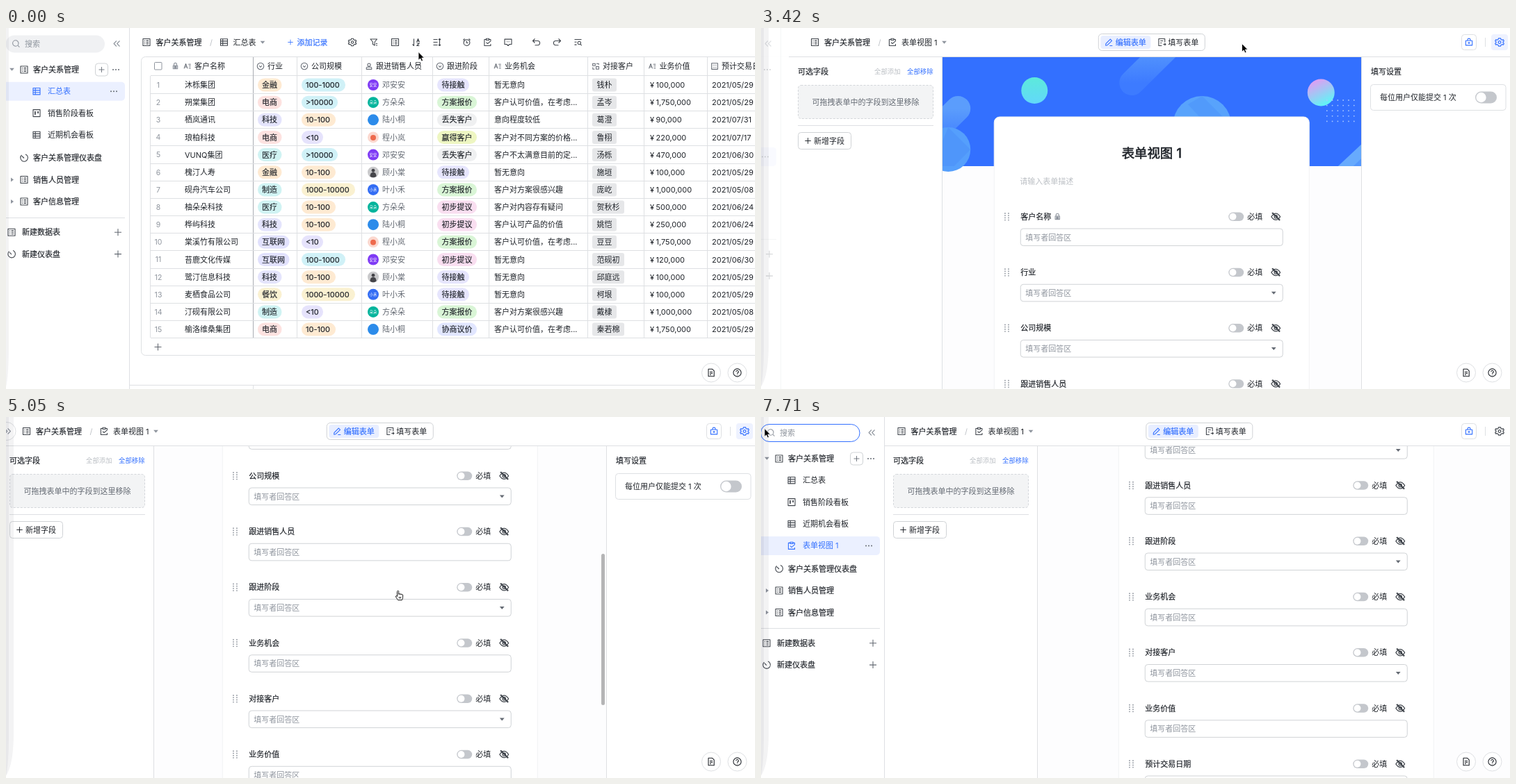
Animation of 1077x520 px, one loop 8 s. Source, as an HTML page:

```html
<!DOCTYPE html>
<html lang="zh-CN">
<head>
<meta charset="utf-8">
<style>
html, body { margin: 0; width: 100%; height: 100%; overflow: hidden; background: #fff; }
svg { display: block; width: 100%; height: 100%; }
text { font-family: Inter, 'Noto Sans CJK SC', 'Noto Sans CJK', sans-serif; white-space: pre; }
</style>
</head>
<body>
<svg id="stage" viewBox="0 0 1077 520" preserveAspectRatio="xMidYMid meet"></svg>
<script>
const INK = '#1f2329', SOFT = '#646a73', GREY = '#8f959e', PALE = '#bbbfc4', LINE = '#dee0e3', BLUE = '#3370ff';

// Icon outlines, drawn around their own centre
const ICONS = {
  base: 'M-5-5H5V5H-5ZM-3-2.4h1M-.5-2.4H3M-3 0h1M-.5 0H3M-3 2.4h1M-.5 2.4H3',
  sheet: 'M-5-4.7H5V4.7H-5ZM-5-1.6H5M-5 1.6H5M-1.8-4.7V4.7',
  kanban: 'M-5-5H5V5H-5ZM-2.4-2.6V2.4M-1.8-2.6V2.4M1.8-2.6V.4M2.4-2.6V.4',
  dial: 'M-3.4-4A5.3 5.3 0 1 0 2-5M0 .5L-3-2.5',
  gear: 'M-1.3-5.2H1.3L1.9-3.7 3.3-2.9 4.9-3.3 5.7-1.5 4.5-.5V.5L5.7 1.5 4.9 3.3 3.3 2.9 1.9 3.7 1.3 5.2H-1.3L-1.9 3.7-3.3 2.9-4.9 3.3-5.7 1.5-4.5.5V-.5L-5.7-1.5-4.9-3.3-3.3-2.9-1.9-3.7ZM1.7 0A1.7 1.7 0 1 1-1.7 0A1.7 1.7 0 1 1 1.7 0',
  filter: 'M-5-4.5H4.5L1.2-.5V4.5L-1.6 3V-.5ZM3 2H5M3 4.5H5',
  sort: 'M-3-5V5L-5 3M1 0L3-5 5 0M1.6-1.6H4.4M1.2 1.5H4.8L1.2 5H4.8',
  height: 'M-5-4H1M-5 0H1M-5 4H1M4-5V5M2.5-3.5L4-5 5.5-3.5M2.5 3.5L4 5 5.5 3.5',
  alarm: 'M4.4.6A4.4 4.4 0 1 1-4.4.6A4.4 4.4 0 1 1 4.4.6M0-2V1H2M-5-3L-3-5M5-3L3-5',
  form: 'M-2-4H-4.6V5H4.4V2.6M4.4-1.6V-4H2M-2-5.2H2V-3H-2ZM-2 .2L0 2.2 4.6-1.8',
  chat: 'M-5-4.4H5V3H2L0 5-2 3H-5ZM-2.2-.8h.8M-.4-.8h.8M1.4-.8h.8',
  undo: 'M-2-5L-5-2-2 1M-5-2H2A3 3 0 0 1 2 4.2H-2',
  redo: 'M2-5L5-2 2 1M5-2H-2A3 3 0 0 0-2 4.2H2',
  find: 'M-5-4H5M-5-.2H-2M-5 3.6H-2M4 1A2.2 2.2 0 1 1-.4 1A2.2 2.2 0 1 1 4 1M3.4 2.8L5.2 4.6',
  search: 'M4-1A4.2 4.2 0 1 1-4.4-1A4.2 4.2 0 1 1 4-1M3 2L5.4 4.6',
  lock: 'M-3.2-.8H3.2V3.8H-3.2ZM-2-.8V-2.6A2 2 0 0 1 2-2.6V-.8M-2 1.5H2M-2 .4H2M-2 2.6H2',
  safe: 'M-4.6-2.2H4.6V4.4H-4.6ZM-2-2.2V-3.4A2 2 0 0 1 2-3.4V-2.2M0-.6V2.6M-1.6 1H1.6',
  person: 'M2.2-2A2.2 2.2 0 1 1-2.2-2A2.2 2.2 0 1 1 2.2-2M-4 4.6V3Q-4 1.4-2 1.4H2Q4 1.4 4 3V4.6Z',
  pick: 'M5 0A5 5 0 1 1-5 0A5 5 0 1 1 5 0M-2-.8L0 1.4 2-.8',
  text: 'M-5.2 3.6L-2.6-3.6 0 3.6M-4.2 1H-1M1.4-3H5M2-.2H5M2 2.8H5',
  link: 'M-4.6-4H-.8V-.8H-4.6ZM.6.6H4.6V4.4H.6ZM1-4H4.4V-2M-4.4 1.6V4.4H-1.6',
  date: 'M-4.6-4.4H4.6V4.6H-4.6ZM-2.6-1.6h1M-.5-1.6h1M1.6-1.6h1M-2.6 1.6h1M-.5 1.6h1M1.6 1.6h1',
  hidden: 'M-5.8 0Q0-8.4 5.8 0Q0 8.4-5.8 0ZM2 0A2 2 0 1 1-2 0A2 2 0 1 1 2 0M-5-5L5 5M-4.2-5.4L5.6 4.4',
  pen: 'M-4.4 2.2L2-4.4 4.2-2.2-2.2 4.2-4.6 4.6ZM1 5H5',
  fill: 'M4.4 0V-5H-4.4V5H0M-2-2H2M2 3H5.4M4 1.4L5.6 3 4 4.6M-2 1H0',
  doc: 'M-4-5.2H1.6L4.2-2.6V5.2H-4ZM-2-1H2M-2 1H2M-2 3H0',
  help: 'M5.6 0A5.6 5.6 0 1 1-5.6 0A5.6 5.6 0 1 1 5.6 0M-1.8-1.2A1.8 1.8 0 1 1 0 .6V1.4M0 2.8V3.4',
  plus: 'M-5 0H5M0-5V5',
  fold: 'M-.6-4L-4.4 0-.6 4M4-4L.2 0 4 4',
  unfold: 'M.6-4L4.4 0 .6 4M-4-4L-.2 0-4 4'
};

const path = (d, fill, extra = '') => `<path d="${d}" fill="${fill}" ${extra}/>`;
const icon = (name, x, y, color = '#41464d', k = 1) =>
  `<path transform="translate(${x} ${y}) scale(${k})" d="${ICONS[name]}" fill="none" stroke="${color}" stroke-width="1.1" stroke-linejoin="round"/>`;
const box = (x, y, w, h, r, fill, stroke = 'none', extra = '') =>
  `<rect x="${x}" y="${y}" width="${w}" height="${h}" rx="${r}" fill="${fill}" stroke="${stroke}" ${extra}/>`;
const dot = (x, y, r, fill, stroke = 'none') => `<circle cx="${x}" cy="${y}" r="${r}" fill="${fill}" stroke="${stroke}"/>`;
const line = (d, color = LINE) => path(d, 'none', `stroke="${color}"`);
// Text is centred vertically on y; a hairline outline gives the medium weight
const label = (s, x, y, { c = INK, size = 11, bold = 0, anchor = 'start' } = {}) =>
  `<text x="${x}" y="${y + size * .37}" font-size="${size}" fill="${c}" text-anchor="${anchor}" ${bold ? `stroke="${c}" stroke-width="${bold}"` : ''}>${s.replace(/</g, '&lt;')}</text>`;
const strong = (s, x, y, c = INK) => label(s, x, y, { c, bold: .2 });
const caret = (x, y, c = SOFT) => path(`M${x - 3.4} ${y - 1.8}h6.8l-3.4 4z`, c);
const more = (x, y) => [-4, 0, 4].map(d => dot(x + d, y, 1, SOFT)).join('');
const toggle = (x, y, w, h) => box(x, y - h / 2, w, h, h / 2, '#c4c7cc') + dot(x + h / 2, y, h / 2 - 1.3, '#fff');
const group = (id, body, extra = '') => `<g id="${id}" ${extra}>${body}</g>`;

const INDUSTRY = { 金融: '#feead2', 电商: '#fde2e0', 科技: '#e4e4fc', 医疗: '#d0f3f3', 制造: '#d0f3f3', 互联网: '#e1e1fd', 餐饮: '#faf1d1' };
const SCALE = { '100-1000': ['#d0f1f7', 63], '>10000': ['#d0f1f7', 52], '10-100': ['#feead2', 49], '<10': ['#e6e3fc', 31], '1000-10000': ['#faf1d1', 77] };
const STAGE = { 待接触: '#e6e5fd', 方案报价: '#d9f5d6', 丢失客户: '#eff0f1', 赢得客户: '#eef6c2', 初步提议: '#f9def0', 协商议价: '#e1e6ff' };
const SALES = [['邓安安', '#7f3bf5', '安安'], ['方朵朵', '#04b49c', '朵朵'], ['陆小桐', '#2c8bea'], ['程小岚', '#fbd8cf'], ['顾小棠', '#c9c9cb'], ['叶小禾', '#336df4', '小禾']];
const CHANCE = ['暂无意向', '客户认可价值，在考虑...', '意向程度较低', '客户对不同方案的价格...', '客户不太满意目前的定...', '客户对方案很感兴趣', '客户对内容存有疑问', '客户认可产品的价值'];
const ROWS = `沐栎集团|金融|100-1000|0|待接触|0|钱朴|100|05/29
朔棠集团|电商|>10000|1|方案报价|1|孟岑|1750|05/29
栖岚通讯|科技|10-100|2|丢失客户|2|葛澄|90|07/31
琅柏科技|电商|<10|3|赢得客户|3|鲁栩|220|07/17
VUNQ集团|医疗|>10000|0|丢失客户|4|汤栎|470|06/30
槐汀人寿|金融|10-100|4|待接触|0|施垣|100|05/29
砚舟汽车公司|制造|1000-10000|5|方案报价|5|庞屹|1000|05/08
柚朵朵科技|医疗|10-100|1|初步提议|6|贺秋杉|500|06/24
桦屿科技|科技|10-100|2|初步提议|7|姚恺|250|06/24
棠溪竹有限公司|互联网|<10|3|方案报价|1|豆豆|1750|05/29
苔鹿文化传媒|互联网|100-1000|0|初步提议|0|范砚初|120|06/30
鹭汀信息科技|科技|10-100|4|待接触|0|邱庭远|100|05/29
麦栖食品公司|餐饮|1000-10000|5|待接触|0|柯垠|100|05/29
汀砚有限公司|制造|<10|1|方案报价|5|戴棣|1000|05/08
榆洛维桑集团|电商|10-100|2|协商议价|1|秦若棉|1750|05/29`.split('\n').map(r => r.split('|'));

function avatar(i, y) {
  const [, color, mark] = SALES[i];
  let s = dot(528, y, 8, color);
  if (mark) s += label(mark, 528, y, { c: '#fff', size: 5.5, anchor: 'middle' });
  if (i === 3) s += dot(528, y + .5, 4, '#ee6a4d');
  if (i === 4) s += dot(528, y - 2.5, 2.4, '#45454a') + path(`M523.5 ${y + 6}q0-6 4.5-6t4.5 6q-4.5 3-9 0z`, '#45454a');
  return s;
}

function tableRow([name, trade, size, who, stage, chance, contact, value, date], i) {
  const y = 82 + 25.15 * i;
  const pill = (x, w, r, fill) => box(x, y - 9.5, w, 19, r, fill);
  const [tint, width] = SCALE[size];
  return line(`M208 ${Math.round(y + 12) + .5}H1077`) +
    label(String(i + 1), 219, y, { c: GREY, size: 10.5, anchor: 'middle' }) + label(name, 257, y) +
    pill(362, trade.length * 11 + 12.5, 9.5, INDUSTRY[trade]) + label(trade, 368, y, { bold: .15 }) +
    pill(425, width, 9.5, tint) + label(size, 431, y, { bold: .2 }) +
    avatar(+who, y) + label(SALES[who][0], 541, y, { c: SOFT }) +
    pill(620, stage.length * 11 + 13, 9.5, STAGE[stage]) + label(stage, 626.5, y, { bold: .15 }) +
    label(CHANCE[chance], 702, y) +
    pill(843, contact.length * 11 + 13, 3, '#e6e7e9') + label(contact, 849.5, y) +
    label('¥', 926, y) + label((value * 1000).toLocaleString('en-US'), 934.5, y) + label('2021/' + date, 1015, y);
}

function crumbs(kind, name, caretX) {
  return icon('base', 202, 20.5) + strong('客户关系管理', 215.5, 20.5) + label('/', 293, 20.5, { c: PALE }) +
    icon(kind, 313.5, 20.5) + label(name, 326.5, 20.5) + caret(caretX, 20.5, GREY);
}

function tableView() {
  const heads = [['text', 261, '客户名称'], ['pick', 366, '行业'], ['pick', 429, '公司规模'], ['person', 522, '跟进销售人员'], ['pick', 624, '跟进阶段'],
    ['text', 707, '业务机会'], ['link', 848, '对接客户'], ['text', 929.5, '业务价值'], ['date', 1019, '预计交易日期']];
  const tools = { gear: 498, filter: 529, base: 559.5, sort: 589.5, height: 619.5, alarm: 662.5, form: 692.5, chat: 722, undo: 762.5, redo: 792.5, find: 822.5 };
  return box(0, 0, 1077, 520, 0, '#fff') + crumbs('sheet', '汇总表', 369) +
    icon('plus', 409, 20.5, BLUE, .75) + strong('添加记录', 418.5, 20.5, BLUE) +
    box(682, 10, 21, 21, 4, '#e4e5e7', 'none', 'id="hover"') +
    Object.entries(tools).map(([n, x]) => icon(n, x, 20.5)).join('') +
    box(194.5, 41.5, 900, 430, 6, '#fff', LINE) + line('M208 68.5H1077M207.5 69V446') +
    line('M' + [418.5, 511.5, 613.5, 694.5, 836.5, 917.5, 1008.5].map(x => x + ' 42V446').join('M')) +
    line('M355.5 42V446', '#a9adb3') +
    box(213.5, 49.5, 10.5, 10.5, 1, '#fff', GREY) + icon('lock', 243.5, 55, GREY) +
    heads.map(([n, x, s]) => icon(n, x, 55, SOFT, .95) + label(s, x + 10, 55)).join('') +
    ROWS.map(tableRow).join('') + icon('plus', 218.5, 459.5, SOFT) + line('M178 514.5H1077M355.5 515V520');
}

function sidebar(id, views, picked) {
  const shift = (views.length - 3) * 31.5;
  const items = views.map(([kind, name], i) => {
    const y = 91.2 + 31.4 * i, on = i === picked;
    return (on ? box(-10, y - 13.5, 181, 27, 5, '#ebf0ff') + more(155, y) : '') +
      icon(kind, 69, y, on ? BLUE : undefined).replace('69', '44') + label(name, 60, y, { c: on ? BLUE : INK });
  });
  const sections = ['客户关系管理仪表盘', '销售人员管理', '客户信息管理'].map((name, i) => {
    const y = 187 + shift + 31.5 * i;
    return icon(i ? 'base' : 'dial', 26, y) + strong(name, 39, y) + (i ? path(`M7 ${y - 3}v6l4-3z`, GREY) : '');
  });
  const creators = [['base', '新建数据表'], ['dial', '新建仪表盘']].map(([kind, name], i) => {
    const y = 294.3 + shift + 31.3 * i;
    return icon(kind, 8, y) + strong(name, 23, y) + icon('plus', 161, y, SOFT);
  });
  return group(id, box(-10, 0, 188, 520, 0, '#fff') + box(-.5, 10.5, 142.5, 25, 12.5, '#f0f1f3', 'none', `id="${id}Search"`) +
    icon('search', 14, 23, GREY) + label('搜索', 27, 23, { c: GREY }) + icon('fold', 159.5, 22.5, GREY) +
    caret(8.5, 59.5, GREY) + icon('base', 26, 60) + strong('客户关系管理', 39, 60) +
    box(128.5, 51, 18, 18, 4, '#fff', '#d0d3d6') + icon('plus', 137.5, 60, SOFT, .8) + more(158, 60) +
    [...items, ...sections, ...creators].join('') + line(`M0 ${273.5 + Math.floor(shift)}H171M177.5 0V520`));
}

// Form art and fields are laid out around x = 0, the middle of the card
function banner() {
  let dots = '';
  for (let r = 0; r < 5; r++) for (let c = 0; c < 6; c++) dots += dot(252 + c * 7.8, 104 + r * 7.6, .9, '#a9c8ff');
  const bar = d => path(d, 'none', 'stroke="url(#sky)" stroke-width="36" stroke-linecap="round"');
  return dot(-168.5, 90, 19, 'url(#mint)') + bar('M-28.5 79L31 20') + bar('M-278.5 116L-330 167') +
    dot(-292.5, 175, 32, '#559ffc') + path('M-292.5 143L-260.5 175L-284 199H-316Z', '#4b92fb', 'opacity=".6"') +
    dot(72.5, 140, 42, '#58a3fc') + path('M72.5 98L114.5 140H80L52 110Z', '#4b92fb', 'opacity=".5"') +
    dot(243.5, 93, 19.5, 'url(#candy)') + dots + path('M268 199L325.5 145V199Z', '#67aafd') + path('M290 199L325.5 165V199Z', '#5598fd');
}

function field([name, select], i) {
  const y = 271.8 + 80.25 * i;
  let grip = '';
  for (let k = 0; k < 8; k++) grip += dot(-210.8 + k % 2 * 5, y - 4.8 + (k >> 1) * 3.2, .9, GREY);
  return grip + strong(name, -188.5, y) + (i ? '' : icon('lock', -135.5, y, GREY)) + toggle(110.5, y, 22, 12.5) +
    label('必填', 137.5, y) + icon('hidden', 178.5, y, '#41464d', 1.1) +
    box(-188.5, y + 17.2, 377, 24.6, 4, '#fff', '#d0d3d6') + label('填写者回答区', -181.5, y + 29.8, { c: GREY }) + (select ? caret(175.5, y + 29.6) : '');
}

const FIELDS = [['客户名称'], ['行业', 1], ['公司规模', 1], ['跟进销售人员'], ['跟进阶段', 1], ['业务机会'], ['对接客户', 1], ['业务价值'], ['预计交易日期'], ['备注']];

function formView() {
  const card = box(-226.5, 128, 453, 1200, 8, '#fff', '#f1f2f4') +
    group('lift', box(-232.5, 564, 466, 100, 24, '#f4f4f5') + box(-226.5, 550, 453, 100, 0, '#fff') + box(-226.5, 654, 453, 20, 0, '#fff')) +
    label('表单视图 1', 0, 180, { size: 18.4, bold: .6, anchor: 'middle' }) +
    label('请输入表单描述', -189.5, 220.5, { c: PALE }) + FIELDS.map(field).join('');
  const left = box(-208, 42, 420, 480, 0, '#fff') + strong('可选字段', 5, 62.5) +
    label('全部添加', 115, 62.5, { c: PALE, size: 9.4 }) + label('全部移除', 162, 62.5, { c: BLUE, size: 9.4 }) +
    box(5.5, 82.5, 194, 48, 4, '#f3f4f5', '#d3d6da', 'stroke-dasharray="3 2"') +
    label('可拖拽表单中的字段到这里移除', 102.5, 106.5, { c: SOFT, anchor: 'middle' }) +
    box(5.5, 150.5, 76, 24, 4, '#fff', '#d0d3d6') + icon('plus', 19.5, 162.5, INK, .85) + label('新增字段', 28, 162.5) +
    line('M5 140.5H200M212.5 42V520');
  const right = box(863, 42, 214, 478, 0, '#fff') + line('M863.5 42V520') + strong('填写设置', 877, 62.5) +
    box(876.5, 81.5, 194.5, 37, 4, '#fff', LINE) + label('每位用户仅能提交 1 次', 890, 100) + toggle(1027, 100, 31, 17);
  const tabs = box(-76.5, 8.5, 153, 24, 5, '#fff', '#d0d3d6') + box(-73.5, 11, 72, 19, 4, '#e8eeff') +
    icon('pen', -61.5, 20.5, BLUE) + strong('编辑表单', -52, 20.5, BLUE) + icon('fill', 14.5, 20.5) + label('填写表单', 23.5, 20.5);
  return box(0, 0, 1077, 520, 0, '#fdfdfe') + group('page', box(-700, 42, 1400, 157, 0, BLUE) + banner() + card) +
    group('left', left) + group('right', right) + box(856, 0, 5, 218, 2.5, '#4a4a4a', 'none', 'id="bar" fill-opacity=".4"') +
    box(0, 0, 1077, 41, 0, '#fff') + group('rule', line('M-8 41.5H1085')) +
    group('crumbs', crumbs('form', '表单视图 1', 388)) + group('tabs', tabs) +
    box(1007.5, 9.5, 21, 22, 4, '#fff', LINE) + icon('safe', 1018, 20.5, BLUE) + line('M1041.5 14V27') +
    box(1050, 9, 24, 23, 4, '#eef2ff', 'none', 'id="gearBack"') +
    group('gearOn', icon('gear', 1062, 20.5, BLUE, 1.1)) + group('gearOff', icon('gear', 1062, 20.5, '#41464d', 1.1)) +
    group('opener', dot(1, 20.5, 13, '#fff', LINE) + icon('unfold', 2, 20.5, GREY));
}

const fade = (id, a, b, dir) =>
  `<linearGradient id="${id}" x1="0" y1="0" ${dir}><stop stop-color="${a}"/><stop offset="1" stop-color="${b}"/></linearGradient>`;
const edge = w => path(`M0 0H${w}V455Q${w} 500 0 517Z`, INK, 'fill-opacity=".05"');
const VIEWS = [['sheet', '汇总表'], ['kanban', '销售阶段看板'], ['sheet', '近期机会看板']];

document.getElementById('stage').innerHTML =
  `<defs>${fade('mint', '#5ceadb', '#62d8fa', 'x2="0" y2="1"')}${fade('candy', '#f58ff2', '#63f2f6', 'x2=".5" y2="1"')}${fade('sky', '#5b9dfc', '#3d7bff', 'x2="0" y2="1"')}
  <filter id="shade" x="-30%" y="-50%" width="160%" height="220%"><feDropShadow dx="0" dy="4" stdDeviation="4" flood-opacity=".15"/></filter></defs>` +
  group('table', tableView() + sidebar('sideTable', VIEWS, 0)) +
  group('form', formView() + sidebar('sideForm', [...VIEWS, ['form', '表单视图 1']], 3)) +
  edge(4) + group('edge', edge(11)) +
  [['doc', 1014], ['help', 1051.5]].map(([n, x]) => dot(x, 496.5, 13.5, '#fff', LINE) + icon(n, x, 496.5, INK)).join('') +
  group('tip', box(664, 41, 56, 28, 5, INK) + path('M688 41.5l4-4 4 4z', INK) + label('生成表单', 692, 55, { c: '#fff', size: 9.4, anchor: 'middle' }), 'filter="url(#shade)"') +
  group('cursor', group('arrow', path('M0 0V11.8L2.7 9.4L4.5 13.4L6.5 12.5L4.8 8.6H8.4Z', '#000', 'stroke="#fff" stroke-width=".8"')) +
    group('hand', path('M-1 8V1a1.1 1.1 0 0 1 2.2 0V5a1 1 0 0 1 2 .2a1 1 0 0 1 2 .4a1 1 0 0 1 1.9.5V9q0 2-1.2 4.2H0q-1-2-3-4.4q-.6-1.4.6-1.6q.7 0 1.4.8Z', '#fff', 'stroke="#111" stroke-width="1"') + line('M2 8.5v2.5M4 8.5v2.5', '#111')));

const LOOP = 8000, OPEN = 185;
// Each step changes part of the state and holds until the next one
const STEPS = [
  [0, { view: 'table', x: 593, y: 34.5, hand: 0, hover: 0, tip: 0, side: OPEN, panel: 1, opener: 0, scroll: 0, bar: 0, lift: 0, focus: 0 }],
  [1040, { x: 601, y: 33.5 }], [1190, { x: 627, y: 31 }], [1340, { x: 657, y: 27 }], [1490, { x: 681, y: 24 }],
  [1640, { x: 690, y: 23.5, hand: 1, hover: 1 }], [1780, { x: 691.5, tip: .6 }], [1930, { tip: 1 }],
  [3270, { view: 'form', hand: 0, x: 691.5, y: 22.5, tip: 0, hover: 0 }], [3420, { side: 48 }], [3570, { side: 0 }],
  [3870, { opener: 1, x: 684, y: 42 }], [4020, { x: 651, y: 105 }], [4170, { x: 606, y: 182 }], [4310, { x: 573, y: 235 }], [4460, { x: 563, y: 249.5, bar: 1 }],
  [4760, { scroll: 60 }], [4910, { scroll: 220, hand: 1, x: 563.5, y: 250.5 }], [5050, { scroll: 347.5 }], [5200, { scroll: 392 }],
  [5350, { scroll: 408 }], [5500, { scroll: 413 }], [5650, { scroll: 414, lift: 1 }],
  [6240, { x: 548, y: 243, lift: 0 }], [6390, { x: 478, y: 212, hand: 0 }], [6530, { x: 362, y: 158 }], [6680, { x: 232, y: 102, bar: 0 }],
  [6830, { x: 122, y: 56 }], [6970, { x: 48, y: 30 }], [7120, { x: 14, y: 19 }], [7270, { x: 5, y: 16.5 }],
  [7420, { side: 60, opener: 0, panel: 0 }], [7570, { side: 160 }], [7710, { side: OPEN, focus: 1 }]
];
const states = [];
for (const [at, change] of STEPS) states.push({ ...states.at(-1), ...change, at });

const $ = id => document.getElementById(id);
const show = (id, v) => $(id).setAttribute('opacity', +v);
const move = (id, x, y = 0) => $(id).setAttribute('transform', `translate(${x} ${y})`);

function render(s) {
  const form = s.view === 'form', right = s.panel ? 863 : 1084, closed = OPEN - s.side;
  $('table').setAttribute('display', form ? 'none' : 'inline');
  $('form').setAttribute('display', form ? 'inline' : 'none');
  move('page', (212.5 + s.side + right) / 2, -s.scroll);
  move('left', s.side);
  move('rule', s.side);
  move('crumbs', closed ? 12.5 - closed : 0);
  move('tabs', 537.8 + s.side / 2);
  move('sideForm', -closed * 149 / 137);
  show('sideForm', closed ? s.side / OPEN * 1.1 : 1);
  for (const id of ['right', 'gearBack', 'gearOn']) show(id, s.panel);
  show('gearOff', !s.panel);
  for (const id of ['opener', 'lift', 'bar', 'hover', 'tip']) show(id, s[id]);
  $('bar').setAttribute('y', 43 + s.scroll * .443);
  $('sideFormSearch').setAttribute('fill', s.focus ? '#fff' : '#f0f1f3');
  $('sideFormSearch').setAttribute('stroke', s.focus ? BLUE : 'none');
  show('edge', form);
  move('cursor', s.x, s.y);
  show('arrow', !s.hand);
  show('hand', s.hand);
}

let last;
function tick() {
  const t = performance.now() % LOOP;
  const state = states.findLast(s => s.at <= t);
  if (state !== last) render(last = state);
  requestAnimationFrame(tick);
}
tick();
</script>
</body>
</html>
```
